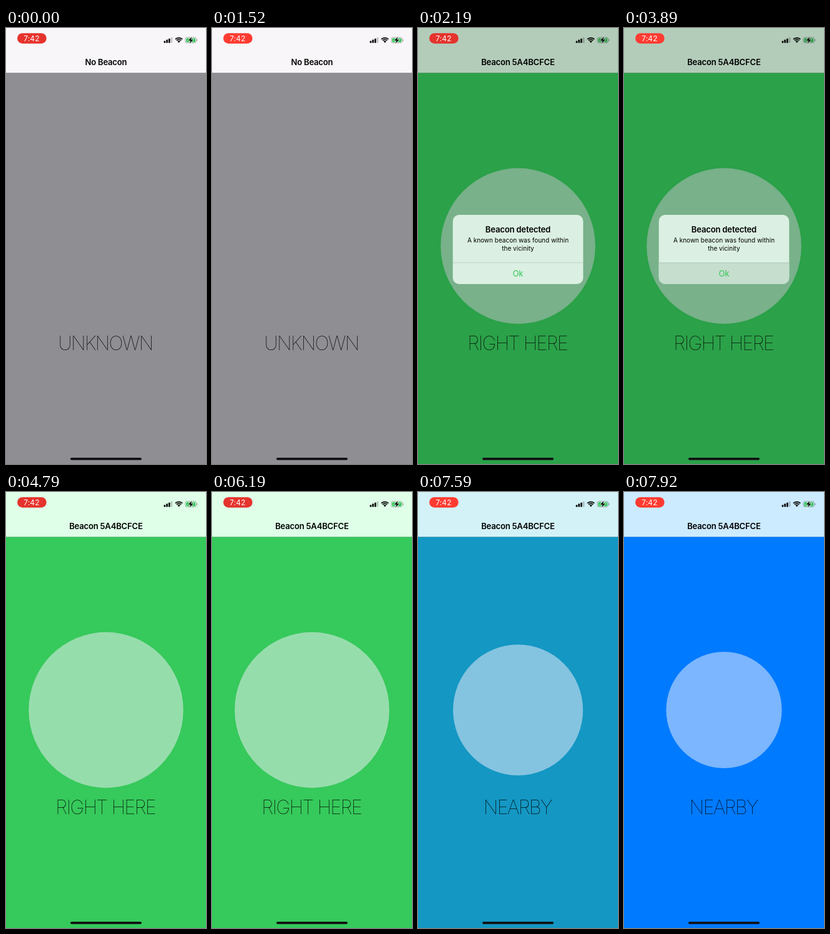
An HTML page with a canvas that plays this animation: 320x693 px, repeating every 7990 ms.

```html
<!DOCTYPE html>
<html lang="en">
<head>
<meta charset="utf-8">
<title>Beacon proximity</title>
<style>
html, body { margin: 0; width: 100%; height: 100%; overflow: hidden; }
canvas { display: block; width: 320px; height: 693px; }
</style>
</head>
<body>
<canvas id="stage"></canvas>
<script>
const W = 320, H = 693, LOOP = 7990;
const canvas = document.getElementById('stage');
const ctx = canvas.getContext('2d');
const dpr = window.devicePixelRatio || 1;
canvas.width = W * dpr;
canvas.height = H * dpr;

const FONT = 'Inter, "Open Sans", sans-serif';
const BAR_H = 71, CX = 160, CY = 346.5;
const STATES = [
  { title: 'No Beacon', label: 'UNKNOWN', bg: [142, 142, 147], bar: [248, 246, 249], r: 0 },
  { title: 'Beacon 5A4BCFCE', label: 'RIGHT HERE', bg: [54, 201, 91], bar: [223, 255, 232], r: 123.7 },
  { title: 'Beacon 5A4BCFCE', label: 'NEARBY', bg: [0, 122, 255], bar: [204, 235, 255], r: 92.5 }
];
const HERE_AT = 1525, NEAR_AT = 7500, MORPH = 320;
const PRESS_AT = 3790, DISMISS_AT = 3930, DISMISS = 250;

const clamp = x => Math.min(1, Math.max(0, x));
const lerp = (a, b, p) => a + (b - a) * p;
const mix = (a, b, p) => a.map((v, i) => lerp(v, b[i], p));
const rgb = c => `rgb(${c.map(Math.round).join()})`;
const ramp = (t, start, length) => clamp((t - start) / length);
const smooth = x => x * x * (3 - 2 * x);
const easeOut = x => 1 - (1 - x) ** 3;

function text(str, x, y, size, weight, color, spacing = 0) {
  ctx.font = `${weight} ${size}px ${FONT}`;
  ctx.letterSpacing = spacing + 'px';
  ctx.textAlign = 'center';
  ctx.textBaseline = 'alphabetic';
  ctx.fillStyle = color;
  ctx.fillText(str, x + spacing / 2, y);
}

function box(x, y, w, h, r, color) {
  ctx.fillStyle = color;
  ctx.beginPath();
  ctx.roundRect(x, y, w, h, r);
  ctx.fill();
}

function disc(r, color) {
  ctx.fillStyle = color;
  ctx.beginPath();
  ctx.arc(CX, CY, r, 0, Math.PI * 2);
  ctx.fill();
}

function drawSignal() {
  for (let i = 0; i < 4; i++) {
    const h = 3.2 + i * 1.9;
    box(252.6 + i * 3.7, 23.7 - h, 2.6, h, 0.7, i < 3 ? '#000' : 'rgba(0,0,0,.22)');
  }
}

function drawWifi() {
  const x = 276.6, y = 23.6, from = -Math.PI * 0.75, to = -Math.PI * 0.25;
  ctx.strokeStyle = ctx.fillStyle = '#000';
  ctx.lineWidth = 1.8;
  for (const r of [8, 5.2]) {
    ctx.beginPath();
    ctx.arc(x, y, r, from, to);
    ctx.stroke();
  }
  ctx.beginPath();
  ctx.moveTo(x, y);
  ctx.arc(x, y, 3.1, from, to);
  ctx.fill();
}

function drawBattery() {
  ctx.strokeStyle = 'rgba(0,0,0,.38)';
  ctx.lineWidth = 0.8;
  ctx.beginPath();
  ctx.roundRect(286.9, 14.9, 17.4, 8.8, 2.6);
  ctx.stroke();
  box(288.2, 16.2, 14.8, 6.2, 1.5, '#34c759');
  box(305.1, 17.7, 1.1, 3.2, 0.6, 'rgba(0,0,0,.38)');
  ctx.beginPath();
  [[297.3, 14], [291.6, 19.9], [295.2, 19.9], [293.8, 24.4], [299.6, 18.4], [296, 18.4]]
    .forEach(p => ctx.lineTo(...p));
  ctx.closePath();
  ctx.strokeStyle = '#e8f5ec';
  ctx.lineWidth = 1.4;
  ctx.stroke();
  ctx.fillStyle = '#000';
  ctx.fill();
}

// The recording pill breathes between two reds.
function drawPill(t) {
  const phase = (t - 900 + 2030) % 2030;
  const glow = smooth(ramp(phase, 0, 450)) * (1 - smooth(ramp(phase, 950, 200)));
  box(18.1, 8.2, 46.6, 16.5, 8.25, rgb(mix([229, 51, 45], [255, 59, 49], glow)));
  text('7:42', 40.9, 20.8, 12, 400, '#fff', 0.1);
}

function drawAlert(t, alpha, scale) {
  ctx.save();
  ctx.globalAlpha = alpha;
  ctx.translate(CX, 352);
  ctx.scale(scale, scale);
  ctx.translate(-CX, -352);
  box(55.7, 297, 208.6, 110, 10, 'rgb(219,240,226)');
  if (t >= PRESS_AT) box(55.7, 373, 208.6, 34, [0, 0, 10, 10], 'rgb(197,222,205)');
  ctx.fillStyle = 'rgba(60,90,70,.28)';
  ctx.fillRect(55.7, 372.7, 208.6, 0.7);
  text('Beacon detected', CX, 325, 13.1, 600, '#000', -0.2);
  text('A known beacon was found within', CX, 341, 10, 400, '#000', 0);
  text('the vicinity', CX, 354.3, 10, 400, '#000', 0);
  const tint = mix([0, 122, 255], [52, 199, 89], smooth(ramp(t, 1700, 300)));
  text('Ok', CX, 395, 13.1, 400, rgb(tint), -0.2);
  ctx.restore();
}

function draw(t) {
  const step = t < HERE_AT ? 0 : t < NEAR_AT ? 1 : 2;
  const to = STATES[step], from = STATES[Math.max(0, step - 1)];
  const p = step ? easeOut(ramp(t, step === 1 ? HERE_AT : NEAR_AT, MORPH)) : 1;

  const since = Math.max(0, t - HERE_AT);
  const gone = smooth(ramp(t, DISMISS_AT, DISMISS));
  const shown = smooth(ramp(since, 0, 200)) * (1 - gone);
  const scale = 1 + 0.2 * Math.exp(-since / 96);

  ctx.setTransform(dpr, 0, 0, dpr, 0, 0);
  ctx.fillStyle = rgb(mix(from.bg, to.bg, p));
  ctx.fillRect(0, 0, W, H);
  const r = lerp(from.r, to.r, p);
  if (r > 0) disc(r, 'rgba(246,242,253,.5)');
  const bar = mix(from.bar, to.bar, p);
  ctx.fillStyle = rgb(bar);
  ctx.fillRect(0, 0, W, BAR_H);
  ctx.fillStyle = rgb(bar.map(v => v * 0.7));
  ctx.fillRect(0, BAR_H, W, 0.5);

  text(to.title, CX, 59, 13.1, 600, '#000', -0.22);
  text(to.label, CX, 512.2, 30.8, 100, '#000', -1.75);
  drawSignal();
  drawWifi();
  drawBattery();

  ctx.fillStyle = `rgba(0,0,0,${0.2 * shown})`;
  ctx.fillRect(0, 0, W, H);
  drawPill(t);
  if (shown > 0) drawAlert(t, shown, scale);
  box(103, 682.9, 114, 3.9, 1.95, '#121214');
}

const start = performance.now();
function tick() {
  draw((performance.now() - start) % LOOP);
  requestAnimationFrame(tick);
}
tick();
</script>
</body>
</html>
```
